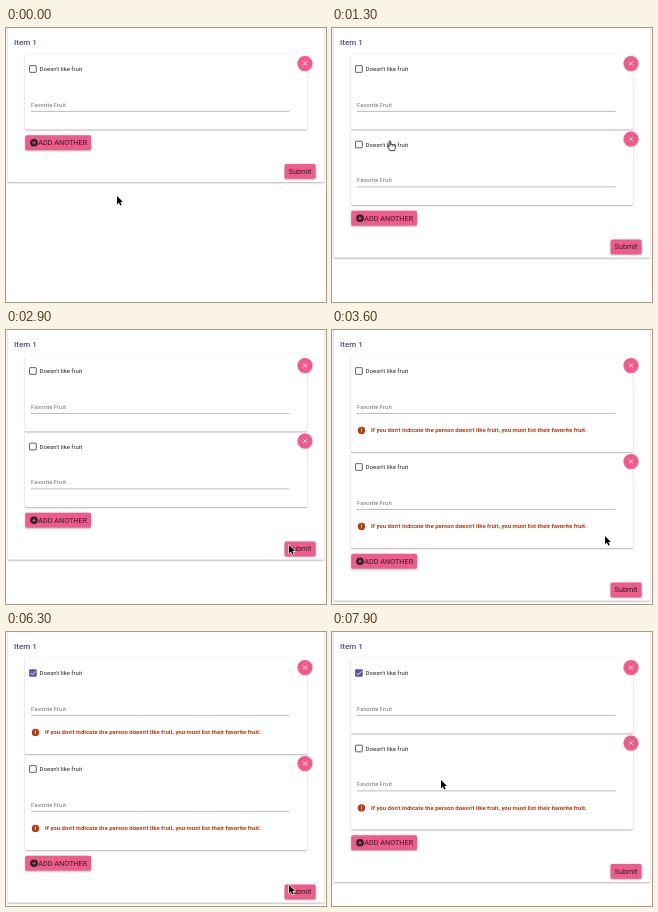
Write an HTML page with a canvas that moves like this. It is 320 px wide and 274 px high and loops after 8 s.

```html
<!DOCTYPE html>
<html lang="en">
<head>
<meta charset="utf-8">
<title>Fruit form</title>
<style>
html, body { margin: 0; width: 100%; height: 100%; overflow: hidden; background: #fff; }
canvas { display: block; width: 320px; height: 274px; }
</style>
</head>
<body>
<canvas id="stage"></canvas>
<script>
const W = 320, H = 274, LOOP = 8000, STEP = 100;
const PINK = '#ef5c8c', INK = '#222', RUST = '#b23c17', INDIGO = '#5559a6';
const CARD = 75.5, ERROR = 20.5, TOP = 26;
const ADD_AT = 1000, SUBMIT_AT = 3000, CHECK_AT = 4600, RESUBMIT_AT = 6500;

// time, x, y of the pointer
const PATH = [
  [0, 111, 168], [800, 58, 113], [1900, 58, 113], [2000, 113, 128],
  [2800, 283, 215], [3500, 283, 215], [3600, 273, 206], [4400, 66, 40],
  [5300, 66, 40], [6200, 283, 253], [7300, 283, 253], [7900, 109, 148]
];

const canvas = document.getElementById('stage');
const ctx = canvas.getContext('2d');
const dpr = window.devicePixelRatio || 1;
canvas.width = Math.round(W * dpr);
canvas.height = Math.round(H * dpr);

function shadow(alpha, blur, dy) {
  ctx.shadowColor = `rgba(0,0,0,${alpha})`;
  ctx.shadowBlur = blur * dpr;
  ctx.shadowOffsetY = dy * dpr;
}

function box(x, y, w, h, r, fill) {
  ctx.beginPath();
  ctx.roundRect(x, y, w, h, r);
  ctx.fillStyle = fill;
  ctx.fill();
}

function disc(x, y, r, fill) {
  ctx.beginPath();
  ctx.arc(x, y, r, 0, Math.PI * 2);
  ctx.fillStyle = fill;
  ctx.fill();
}

function line(points, color, width) {
  ctx.beginPath();
  points.forEach(([x, y], i) => i ? ctx.lineTo(x, y) : ctx.moveTo(x, y));
  ctx.strokeStyle = color;
  ctx.lineWidth = width;
  ctx.stroke();
}

function text(str, x, y, size, color, weight = 400) {
  ctx.font = `${weight} ${size}px Roboto, Arial, sans-serif`;
  ctx.fillStyle = color;
  ctx.fillText(str, x, y);
}

function raised(x, y, w, h, r, fill) {
  ctx.save();
  shadow(0.35, 2, 0.8);
  box(x, y, w, h, r, fill);
  ctx.restore();
}

function panel(x, y, w, h) {
  ctx.save();
  shadow(0.36, 1.7, 0.7);
  box(x, y, w, h, 1.5, '#fff');
  ctx.restore();
}

function checkbox(x, y, on) {
  if (on) {
    box(x, y, 7.6, 7.6, 0.8, INDIGO);
    line([[x + 1.5, y + 3.9], [x + 3.1, y + 5.5], [x + 6.3, y + 2.2]], '#fff', 0.9);
  } else {
    ctx.strokeStyle = '#4d4d4d';
    ctx.lineWidth = 0.9;
    ctx.beginPath();
    ctx.roundRect(x + 0.45, y + 0.45, 6.7, 6.7, 0.5);
    ctx.stroke();
  }
}

function drawItem(item) {
  const y = item.y;
  checkbox(23.1, y + 11.2, item.checked);
  text("Doesn't like fruit", 33.6, y + 17.2, 6, INK);
  text('Favorite Fruit', 25, y + 52.8, 6, '#707070');
  line([[25, y + 57.4], [283.5, y + 57.4]], '#8e8e8e', 0.6);

  if (item.error) {
    disc(29.5, y + 74.4, 3.7, RUST);
    line([[29.5, y + 72.4], [29.5, y + 74.9]], '#fff', 0.8);
    line([[29.5, y + 75.5], [29.5, y + 76.3]], '#fff', 0.8);
    text("If you don't indicate the person doesn't like fruit, you must list their favorite fruit.",
      39, y + 76.4, 6, RUST, 700);
  }

  ctx.save();
  shadow(0.25, 1.6, 0.6);
  disc(299, y + 9.5, 7.5, PINK);
  ctx.restore();
  line([[297, y + 7.5], [301, y + 11.5]], '#fff', 0.75);
  line([[301, y + 7.5], [297, y + 11.5]], '#fff', 0.75);
}

function layout(t) {
  const items = [{ checked: t >= CHECK_AT, error: t >= SUBMIT_AT && t < RESUBMIT_AT }];
  if (t >= ADD_AT) items.push({ checked: false, error: t >= SUBMIT_AT });
  let y = TOP;
  for (const item of items) {
    item.y = y;
    item.h = CARD + (item.error ? ERROR : 0);
    y += item.h;
  }
  return { items, end: y };
}

function pointer(t) {
  let i = 0;
  while (i < PATH.length - 2 && t >= PATH[i + 1][0]) i++;
  const [t0, x0, y0] = PATH[i], [t1, x1, y1] = PATH[i + 1];
  const p = Math.min(1, (t - t0) / (t1 - t0));
  const e = p * p * (3 - 2 * p);
  return { x: x0 + (x1 - x0) * e, y: y0 + (y1 - y0) * e };
}

function overLink({ x, y }, { items, end }) {
  const inAdd = x >= 19 && x <= 85 && y >= end + 5.5 && y <= end + 20.5;
  return inAdd || items.some(i => x >= 23 && x <= 77 && Math.abs(y - i.y - 15) <= 5);
}

const ARROW = new Path2D('M0 0V8.4L1.9 6.6L3.2 9.6L4.7 9L3.4 6.1H6Z');
const HAND = new Path2D('M-.8 .7C-.8 -.4 .8 -.4 .8 .7V3.6C1.4 3 2.3 3.2 2.5 3.9' +
  'C3.1 3.4 4 3.6 4.1 4.3C4.9 4 5.5 4.4 5.5 5.2C5.5 7.2 4.9 8 4.5 9.6H-.1' +
  'C-.6 8.2 -1.9 7 -2.5 5.7C-2.7 4.9 -1.7 4.6 -.8 5.7Z');

function drawPointer(p, hand) {
  ctx.save();
  ctx.translate(p.x, p.y);
  ctx.lineJoin = 'round';
  if (hand) {
    ctx.fillStyle = '#fff';
    ctx.fill(HAND);
    ctx.strokeStyle = '#111';
    ctx.lineWidth = 0.8;
    ctx.stroke(HAND);
    line([[0.8, 3.6], [0.8, 5.2]], '#111', 0.5);
    line([[2.5, 3.9], [2.5, 5.4]], '#111', 0.5);
    line([[4.1, 4.3], [4.1, 5.6]], '#111', 0.5);
  } else {
    ctx.strokeStyle = '#fff';
    ctx.lineWidth = 1.2;
    ctx.stroke(ARROW);
    ctx.fillStyle = '#000';
    ctx.fill(ARROW);
  }
  ctx.restore();
}

function draw(t) {
  const form = layout(t), { items, end } = form;
  ctx.setTransform(dpr, 0, 0, dpr, 0, 0);
  ctx.fillStyle = '#fff';
  ctx.fillRect(0, 0, W, H);

  panel(1.5, -4, 316.5, end + 56.8);
  text('Item 1', 8, 16.9, 8, '#474c91', 500);
  [...items].reverse().forEach(i => panel(19, i.y, 282, i.h));
  items.forEach(drawItem);

  raised(19.2, end + 5.8, 65.8, 14.8, 1.5, PINK);
  const my = end + 13.3;
  disc(28, my, 3.8, INK);
  line([[26, my], [30, my]], PINK, 0.8);
  line([[28, my - 2], [28, my + 2]], PINK, 0.8);
  text('ADD ANOTHER', 32.2, end + 15.9, 7.25, INK);

  raised(278.6, end + 34.5, 31, 14.8, 1.5, PINK);
  text('Submit', 282.6, end + 44.4, 7.25, INK);

  const p = pointer(t);
  drawPointer(p, overLink(p, form));
}

const start = performance.now();
function tick() {
  const t = (performance.now() - start) % LOOP;
  draw(Math.floor(t / STEP) * STEP);
  requestAnimationFrame(tick);
}
tick();
</script>
</body>
</html>
```
